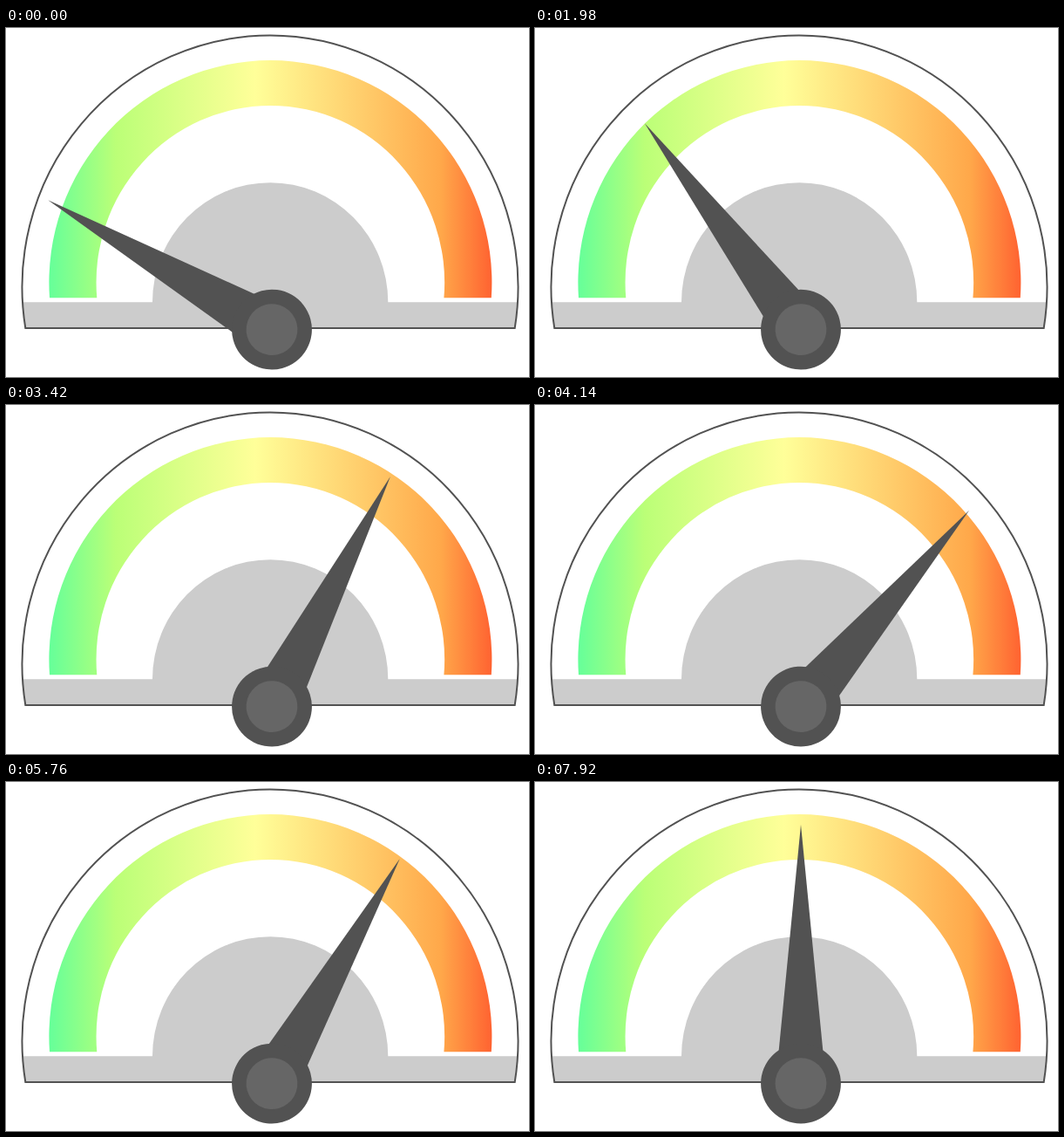
Recreate the animation shown at these times as an HTML page. Size 600 by 400 pixels, loop 8000 ms.

```html
<!DOCTYPE html>
<html lang="en">
<head>
<meta charset="utf-8">
<title>Gauge</title>
<style>
  html, body { margin: 0; width: 100%; height: 100%; overflow: hidden; background: #fff; }
  svg { display: block; width: 100vw; height: 100vh; }
</style>
</head>
<body>
<svg viewBox="0 0 600 400">
  <defs>
    <linearGradient id="scale" gradientUnits="userSpaceOnUse" x1="50" y1="0" x2="557" y2="0">
      <stop offset="0" stop-color="#66ff99"/>
      <stop offset=".15" stop-color="#bbff77"/>
      <stop offset=".465" stop-color="#ffff99"/>
      <stop offset=".885" stop-color="#ffa84a"/>
      <stop offset="1" stop-color="#ff6331"/>
    </linearGradient>
  </defs>
  <!-- base with dome, colour band, outline -->
  <path fill="#ccc" d="M19.2 314.3H168A135 137 0 0 1 438.3 314.3H586.8L583.7 344H22.3Z"/>
  <path fill="url(#scale)" d="M50 309.3A254 254.7 0 1 1 556.8 309.3H502.4A199.8 202.8 0 1 0 104.3 309.3Z"/>
  <path fill="none" stroke="#525252" stroke-width="2" d="M22.3 344A284.5 288.5 0 1 1 583.7 344Z"/>
  <g id="needle" fill="#525252">
    <path d="M0-296.5L25.3-38L0 0L-25.3-38Z"/>
    <circle r="45.9"/>
    <circle r="29.4" fill="#666"/>
  </g>
</svg>
<script>
  const LOOP = 8000, STEP = 180;
  const needle = document.getElementById('needle');

  const progress = (t, from, to) => Math.min(1, Math.max(0, (t - from) / (to - from)));
  const mix = (a, b, k) => a + (b - a) * k;
  const smooth = x => x * x * (3 - 2 * x);
  const easeInOut = x => x < 0.5 ? 4 * x ** 3 : 1 - 4 * (1 - x) ** 3;

  // swing to the right, then blend into the swing back to the top
  function angleAt(t) {
    const rise = mix(-60, 44.3, easeInOut(progress(t, 0, 5215)));
    const fall = mix(45, 0, easeInOut(progress(t, 4000, LOOP)));
    return mix(rise, fall, smooth(progress(t, 4600, 5400)));
  }

  function draw(time) {
    const t = Math.floor((time % LOOP) / STEP) * STEP;
    needle.setAttribute('transform', `translate(305 345.6) rotate(${angleAt(t).toFixed(3)})`);
  }

  let start;
  function tick(now) {
    start ??= now;
    draw(Math.max(0, now - start));
    requestAnimationFrame(tick);
  }
  draw(0);
  requestAnimationFrame(tick);
</script>
</body>
</html>
```
